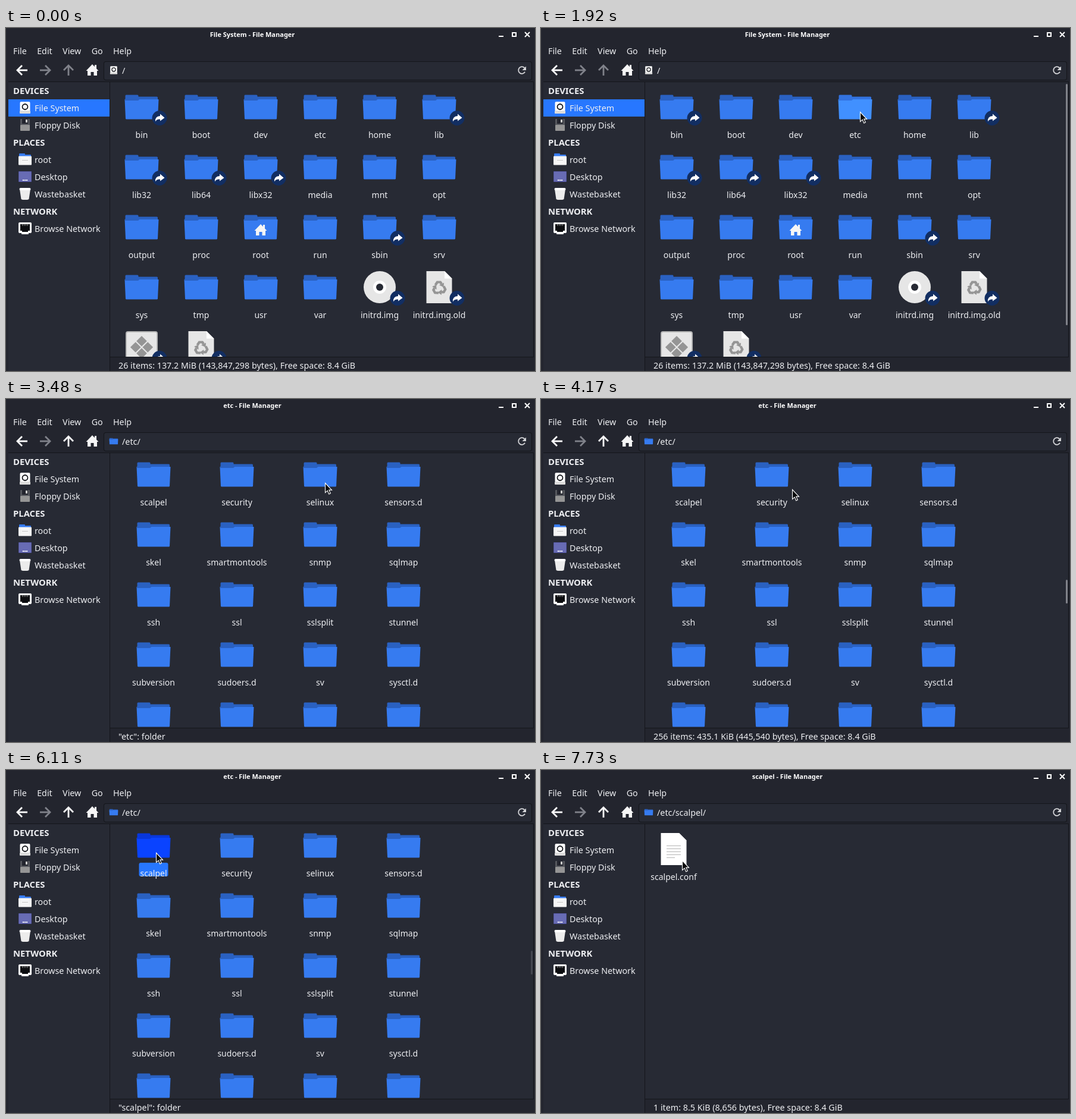
Recreate the animation shown at these times as an HTML page with a canvas. Size 889 by 577 pixels, loop 8000 ms.

```html
<!DOCTYPE html>
<html lang="en">
<head>
<meta charset="utf-8">
<title>File Manager</title>
<style>
html, body { margin: 0; width: 100%; height: 100%; overflow: hidden; background: #23252e; }
canvas { display: block; }
</style>
</head>
<body>
<canvas width="889" height="577"></canvas>
<script>
const ctx = document.querySelector('canvas').getContext('2d');
const LOOP = 8000, STEP = 77, ROW = 101, SIDE_ROW = 29, BAR_FADE = 230;
const CHROME = '#23252e', BASE = '#272a34', EDGE = '#14161b', TEXT = '#eeeff2', ACCENT = '#2777ff';
const DIM = '#80828a', WHITE = '#fff', PAPER = '#e6e6e6', GREY = '#959595', BLUE = '#367bf0', NAVY = '#2a61c1';

// Names ending in "@" are links.
const VIEWS = [
  { start: 0, title: 'File System', path: '/', cell: 100, cols: 6, scroll: 0,
    status: '26 items: 137.2 MiB (143,847,298 bytes), Free space: 8.4 GiB', loaded: 0,
    pick: 'etc', picked: 2550, bar: { top: 94, height: 406, from: 1010, to: 3320 },
    items: 'bin@ boot dev etc home lib@ lib32@ lib64@ libx32@ media mnt opt output proc root run sbin@ srv sys tmp usr var initrd.img@ initrd.img.old@ vmlinuz@ vmlinuz.old@' },
  { start: 3320, title: 'etc', path: '/etc/', cell: 140, cols: 4, scroll: 6,
    status: '256 items: 435.1 KiB (445,540 bytes), Free space: 8.4 GiB', loaded: 3550,
    pick: 'scalpel', picked: 5640, bar: { top: 304, height: 40, from: 3710, to: 6340 },
    items: 'scalpel security selinux sensors.d skel smartmontools snmp sqlmap ssh ssl sslsplit stunnel subversion sudoers.d sv sysctl.d systemd terminfo timidity tmpfiles.d' },
  { start: 6800, title: 'scalpel', path: '/etc/scalpel/', cell: 90, cols: 6, scroll: 0,
    status: '1 item: 8.5 KiB (8,656 bytes), Free space: 8.4 GiB', loaded: 6960,
    items: 'scalpel.conf' }
];

// Each move curves past its bend and starts where the last one ended.
const ENTRY = [660, 575];
const MOVES = [
  { start: 300, end: 830, bend: [430, 545], to: [458, 541] },
  { start: 1150, end: 1920, bend: [265, 330], to: [536, 141] },
  { start: 3860, end: 4630, bend: [400, 150], to: [283, 175] },
  { start: 4710, end: 5180, bend: [285, 224], to: [252, 139] },
  { start: 7420, end: 7730, bend: [246, 142], to: [237, 152] }
];

const lastStarted = (list, t) => list.findLast(e => e.start <= t);

function rect(x, y, w, h, color, radius = 0) {
  ctx.fillStyle = color;
  ctx.beginPath();
  ctx.roundRect(x, y, w, h, radius);
  ctx.fill();
}

function disc(x, y, r, color) {
  ctx.fillStyle = color;
  ctx.beginPath();
  ctx.arc(x, y, r, 0, 7);
  ctx.fill();
}

function arc(x, y, r, from, to, width, color) {
  ctx.strokeStyle = color;
  ctx.lineWidth = width;
  ctx.beginPath();
  ctx.arc(x, y, r, from, to);
  ctx.stroke();
}

function trace(points) {
  ctx.beginPath();
  points.forEach(p => ctx.lineTo(...p));
}

function poly(color, ...points) {
  trace(points);
  ctx.fillStyle = color;
  ctx.fill();
}

// Fills a shape given by its right half.
function mirrored(color, ...half) {
  poly(color, ...half, ...half.map(([x, y]) => [-x, y]).reverse());
}

function line(color, width, ...points) {
  trace(points);
  ctx.strokeStyle = color;
  ctx.lineWidth = width;
  ctx.stroke();
}

function font(size, weight = 400) {
  ctx.font = `${weight} ${size}px "Noto Sans", sans-serif`;
}

function text(str, x, y, { size = 14.3, weight, align = 'left', color = TEXT } = {}) {
  font(size, weight);
  ctx.textAlign = align;
  ctx.fillStyle = color;
  ctx.fillText(str, x, y);
  return ctx.measureText(str).width;
}

function at(x, y, draw, scale = 1, angle = 0) {
  ctx.save();
  ctx.translate(x, y);
  ctx.scale(scale, scale);
  ctx.rotate(angle);
  draw();
  ctx.restore();
}

// Icons are drawn around their centre.
function house() {
  mirrored('#f6f6f6', [0, -10], [10.5, 1], [8, 1], [8, 9], [2.5, 9], [2.5, 3]);
  rect(4, -9, 3, 7, '#f6f6f6');
}

function folder(back, front) {
  rect(-27.5, -20.5, 22, 20, back, 1.5);
  rect(-26, -17.5, 53, 20, back, 1.5);
  mirrored(front, [28.5, -13], [27, 19.5], [26, 20.5]);
  poly(back, [-6, -11], [-3, -13.5], [-28, -13.5], [-28, -11]);
}

function sheet(color) {
  poly(color, [-21.5, -27], [9, -27], [21.5, -14.5], [21.5, 27], [-21.5, 27]);
}

function recycle() {
  for (let i = 0; i < 3; i++) at(0, 1.5, () => {
    line(GREY, 4.2, [-6.5, -5], [-3.2, -10], [2, -10], [4, -7]);
    poly(GREY, [0, -5], [8, -9], [7.5, -1.5]);
  }, 1, i * Math.PI * 2 / 3);
}

function program() {
  rect(-27, -27, 54, 54, '#b5b5b5', 4);
  rect(-25, -25, 50, 50, PAPER, 2);
  for (const x of [-13.5, 1]) for (const y of [-13.5, 1])
    at(0, 0, () => rect(x, y, 12.5, 12.5, GREY), 1, Math.PI / 4);
}

function cd(color) {
  disc(0, 0, 27, color);
  disc(0, 0, 11, WHITE);
  disc(0, 0, 6, BASE);
}

function drive() {
  rect(-8.5, -10, 17, 16, WHITE, 2);
  rect(-9, 5, 18, 5, '#dcdcdc', 1);
  arc(0, -1.5, 4.5, 0, 7, 1.8, EDGE);
}

function linkBadge() {
  disc(0, 0, 12.5, '#122e62');
  ctx.fillStyle = WHITE;
  ctx.beginPath();
  ctx.moveTo(-7, 6);
  ctx.quadraticCurveTo(-8, -3, 1, -3.5);
  ctx.lineTo(1, -7);
  ctx.lineTo(8.5, -.5);
  ctx.lineTo(1, 5);
  ctx.lineTo(1, 2);
  ctx.quadraticCurveTo(-5, 1.5, -7, 6);
  ctx.fill();
}

function icon(name, picked, over) {
  const paper = over ? WHITE : PAPER;
  if (name == 'initrd.img') cd(paper);
  else if (name == 'vmlinuz') program();
  else if (/\.(old|conf)$/.test(name)) {
    sheet(paper);
    poly(WHITE, [9, -27], [21.5, -14.5], [9, -14.5]);
    if (name.endsWith('.old')) recycle();
    else for (let i = 0; i < 5; i++) rect(-12, i * 5 - 6, i == 4 ? 14 : 24, 1, '#b4b4b4');
  } else {
    if (picked) folder('#0837dc', '#0a43ff');
    else if (over) folder('#3373e0', '#4190ff');
    else folder(NAVY, BLUE);
    if (name == 'root') at(0, 5, house);
  }
}

const SIDEBAR = [
  ['DEVICES'],
  ['File System', drive],
  ['Floppy Disk', () => {
    rect(-8, -10, 16, 20, '#55575d', 1);
    rect(-5, -10, 10, 8, CHROME);
    rect(1, -9, 3, 5, '#c9c9c9');
    rect(-8, 0, 16, 10, GREY, 1);
  }],
  ['PLACES'],
  ['root', () => {
    rect(-10, -10, 10, 8, BLUE, 1);
    rect(-10, -8, 20, 8, BLUE, 1);
    rect(-11, -5.5, 22, 15, '#f6f6f6', 1);
    rect(-5, 1, 10, 1, '#c6c6c6');
  }],
  ['Desktop', () => {
    rect(-11, -9, 22, 18, '#5558a0', 1);
    rect(-10, -8, 20, 16, '#686cb4');
    for (let x = -4; x < 4; x += 3) rect(x, 5, 2, 2, WHITE);
  }],
  ['Wastebasket', () => {
    mirrored('#ececec', [9, -8], [6.5, 9], [4, 10]);
    rect(-9.5, -10, 19, 4, WHITE, 2);
  }],
  ['NETWORK'],
  ['Browse Network', () => {
    rect(-11, -10, 22, 18, WHITE, 2);
    rect(-6, 7, 12, 3, WHITE, 1);
    mirrored('#0c0d10', [8, -7], [8, 4], [5, 4], [5, 6]);
    for (let x = -5; x < 6; x += 3) rect(x, -7, 1, 3, '#999');
  }]
];

function arrow(x, angle, color) {
  at(x, 71, () => {
    line(color, 2.8, [-8, 0], [9, 0]);
    line(color, 2.8, [0, -8], [-8, 0], [0, 8]);
  }, 1, angle);
}

function drawHeader(view, isRoot) {
  text(view.title + ' - File Manager', 414, 15, { size: 11, weight: 700, align: 'center', color: WHITE });
  rect(828, 13, 8, 2, WHITE);
  ctx.strokeStyle = WHITE;
  ctx.lineWidth = 2;
  ctx.strokeRect(851, 8, 6, 6);
  for (const side of [-4, 4]) line(WHITE, 2, [876 - side, 7], [876 + side, 15]);

  let menuX = 12;
  for (const menu of ['File', 'Edit', 'View', 'Go', 'Help']) menuX += text(menu, menuX, 44) + 17.3;

  arrow(27, 0, WHITE);
  arrow(66, Math.PI, DIM);
  arrow(105, Math.PI / 2, isRoot ? DIM : WHITE);
  at(145, 71, house);
  rect(164, 56, 720, 32, EDGE, 4);
  rect(165, 57, 718, 30, BASE, 3);
  if (isRoot) at(181, 71, drive, .68);
  else at(181, 71, () => folder(NAVY, BLUE), .26);
  text(view.path, 195, 77);
  arc(867, 71, 5.8, .5, 5.6, 1.8, '#d4d5d8');
  poly('#d4d5d8', [874, 64.5], [874, 71], [867.5, 71]);
}

function drawPanes(isRoot) {
  rect(4, 90, 883, 464, EDGE);
  rect(4, 91, 170, 486, BASE);
  rect(174, 91, 1, 486, EDGE);
  rect(175, 91, 711, 462, BASE);
  if (isRoot) rect(4, 120, 170, SIDE_ROW, ACCENT);
  SIDEBAR.forEach(([label, draw], i) => {
    const y = 111 + i * SIDE_ROW;
    if (draw) {
      at(32, y - 6, draw);
      text(label, 48, y);
    } else text(label, 12, y, { size: 14.8, weight: 700 });
  });
}

function drawItems(view, t, pointer) {
  ctx.save();
  ctx.beginPath();
  ctx.rect(175, 91, 711, 462);
  ctx.clip();
  view.items.split(' ').forEach((item, i) => {
    const name = item.replace('@', '');
    const x = 178 + view.cell * (i % view.cols + .5);
    const y = 133 - view.scroll + Math.floor(i / view.cols) * ROW;
    const picked = name == view.pick && t >= view.picked;
    const halfWidth = name.includes('.') ? 22 : 28;
    const over = pointer && pointer.since >= view.start
      && Math.abs(pointer.x - x) < halfWidth && Math.abs(pointer.y - y) < 23;
    at(x, y, () => {
      icon(name, picked, over);
      if (item != name) at(30, 18.5, linkBadge);
      font(14);
      const width = ctx.measureText(name).width + 4;
      if (picked) rect(-width / 2, 29, width, 23, ACCENT, 3);
      text(name, 0, 52, { size: 14, align: 'center' });
    });
  });
  ctx.restore();
}

function drawScrollbar({ top, height, from, to }, t) {
  if (t < from || t >= to) return;
  const fadeIn = Math.floor((t - from) / 150 + 1) / 2;
  const fadeOut = Math.ceil((to - t) / BAR_FADE) / 3;
  ctx.globalAlpha = Math.min(1, fadeIn, fadeOut);
  rect(882, top, 3, height, DIM, 1.5);
  ctx.globalAlpha = 1;
}

function pointerAt(t) {
  const move = lastStarted(MOVES, t);
  if (!move) return null;
  const from = MOVES[MOVES.indexOf(move) - 1]?.to ?? ENTRY;
  const steps = Math.round((move.end - move.start) / STEP) + 1;
  const beat = (move.end - move.start) / (steps - 1);
  const u = Math.min(1, Math.floor((t - move.start) / beat + 1.001) / steps);
  const e = u * u * (3 - 2 * u);
  const [x, y] = from.map((a, d) =>
    Math.round((1 - e) ** 2 * a + 2 * e * (1 - e) * move.bend[d] + e * e * move.to[d]));
  return { x, y, since: move.start };
}

function drawPointer({ x, y }) {
  at(x + .5, y + .5, () => {
    trace([[0, 0], [0, 16], [3.7, 12.6], [6.2, 18.4], [8.8, 17.2], [6.3, 11.6], [11, 11.6]]);
    ctx.closePath();
    ctx.fillStyle = '#08090b';
    ctx.fill();
    ctx.strokeStyle = WHITE;
    ctx.lineWidth = 1.1;
    ctx.stroke();
  });
}

function statusAt(view, t) {
  if (t >= view.picked + STEP) return `"${view.pick}": folder`;
  return t >= view.loaded ? view.status : `"${view.title == 'etc' ? 'etc' : 'scalpel'}": folder`;
}

function render(t) {
  const view = lastStarted(VIEWS, t), isRoot = view.path == '/';
  const pointer = pointerAt(t);
  rect(0, 0, 889, 577, CHROME);
  drawHeader(view, isRoot);
  drawPanes(isRoot);
  drawItems(view, t, pointer);
  text(statusAt(view, t), 189, 573);
  if (view.bar) drawScrollbar(view.bar, t);
  if (pointer) drawPointer(pointer);
}

const began = performance.now();
function tick() {
  render((performance.now() - began) % LOOP);
  requestAnimationFrame(tick);
}
tick();
</script>
</body>
</html>
```
